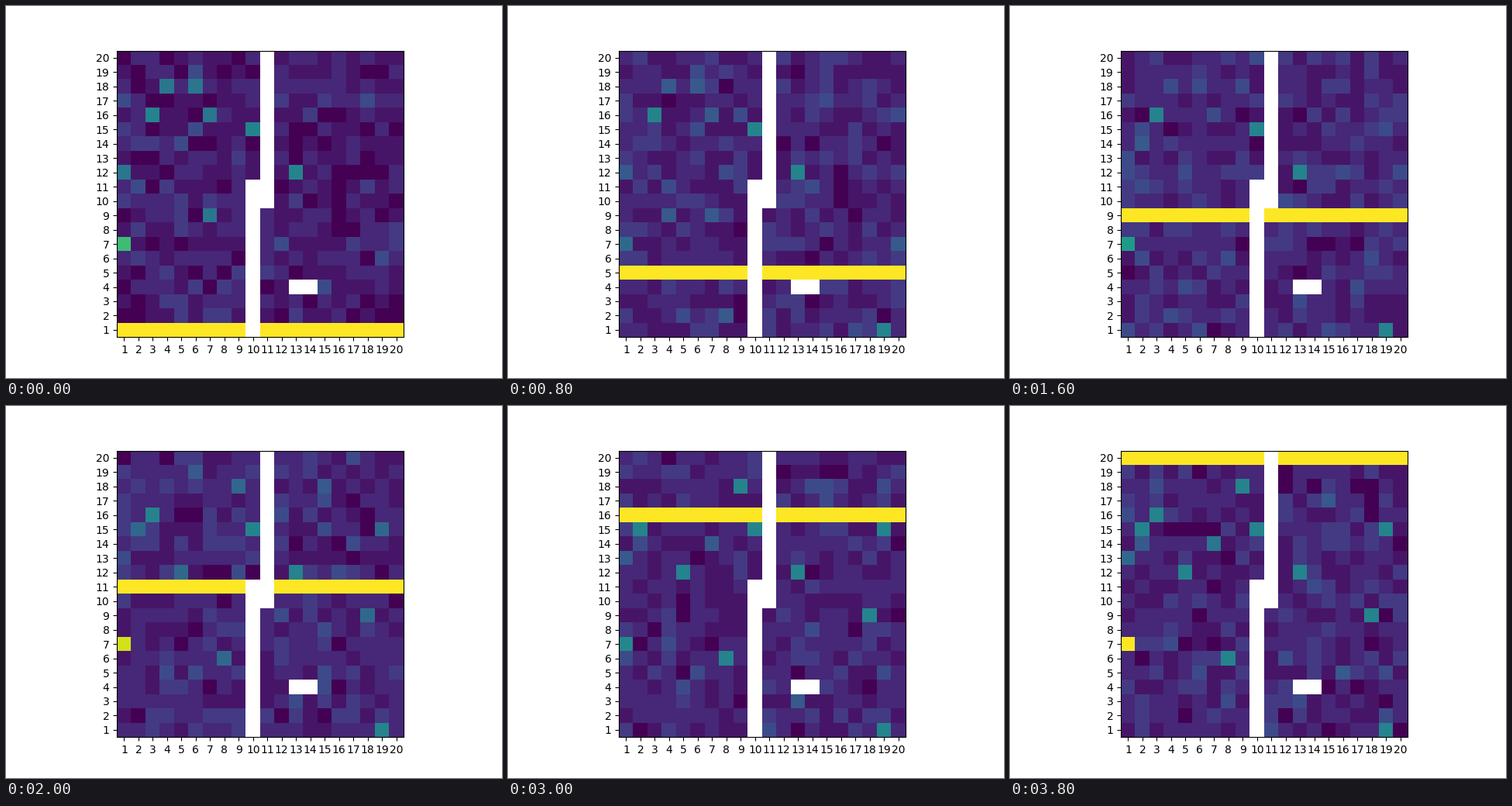
Write a matplotlib script that moves like this. It is 640 px wide and 480 px high and loops after 4000 ms.

```python
import numpy as np
import matplotlib.pyplot as plt
from matplotlib.animation import FuncAnimation

N = 20
INTERVAL = 200
STEP = 0.056  # one noise level on the 0..1 colour scale

# (row, column) of the cells that stand out from the noise
STEADY = [(1, 19), (16, 3), (12, 13), (15, 10)]
RISING = [(6, 8), (18, 9), (15, 19), (9, 18), (15, 2), (12, 5)]
FADING = [(18, 4), (18, 6), (16, 7), (9, 7), (12, 1)]
FLICKER = (7, 1)

# Each cell drifts from one skewed random offset to another
rng = np.random.default_rng(11)
start, end = rng.gamma(1, 0.7, (2, N, N)) - 0.7

dead = np.zeros((N, N), bool)
dead[:11, 9] = True
dead[9:, 10] = True
dead[3, 12:14] = True


def put(level, cells, value):
    for row, col in cells:
        level[row - 1, col - 1] = value


def grid(i):
    """Cell values while row i is lit."""
    t = i / (N - 1)
    noise = np.random.default_rng(100 + i).normal(0, 0.75, (N, N))
    mean = 1.9 - 0.5 * np.exp(-i / 2)
    level = mean + (1 - t) * start + t * end + noise

    put(level, STEADY, 7.5)
    put(level, RISING, 1.5 + 6 * min(1, t / 0.6) ** 2)
    put(level, FADING, 2 + 5 * (1 - t) ** 2)
    values = np.clip(np.round(level), 0, None) * STEP

    flicker = np.interp(i, [0, 6, 10, 12, 19], [0.69, 0.16, 0.93, 0.06, 1])
    put(values, [FLICKER], flicker)
    values[i] = 1
    return np.ma.masked_array(values, dead)


fig, ax = plt.subplots(figsize=(6.4, 4.8), dpi=100)
image = ax.imshow(grid(0), origin="lower", cmap="viridis", vmin=0, vmax=1,
                  interpolation="nearest")
ax.set_xticks(range(N), range(1, N + 1))
ax.set_yticks(range(N), range(1, N + 1))


def update(i):
    image.set_data(grid(i))
    return [image]


anim = FuncAnimation(fig, update, frames=N, interval=INTERVAL, repeat=True)
plt.show()
```
